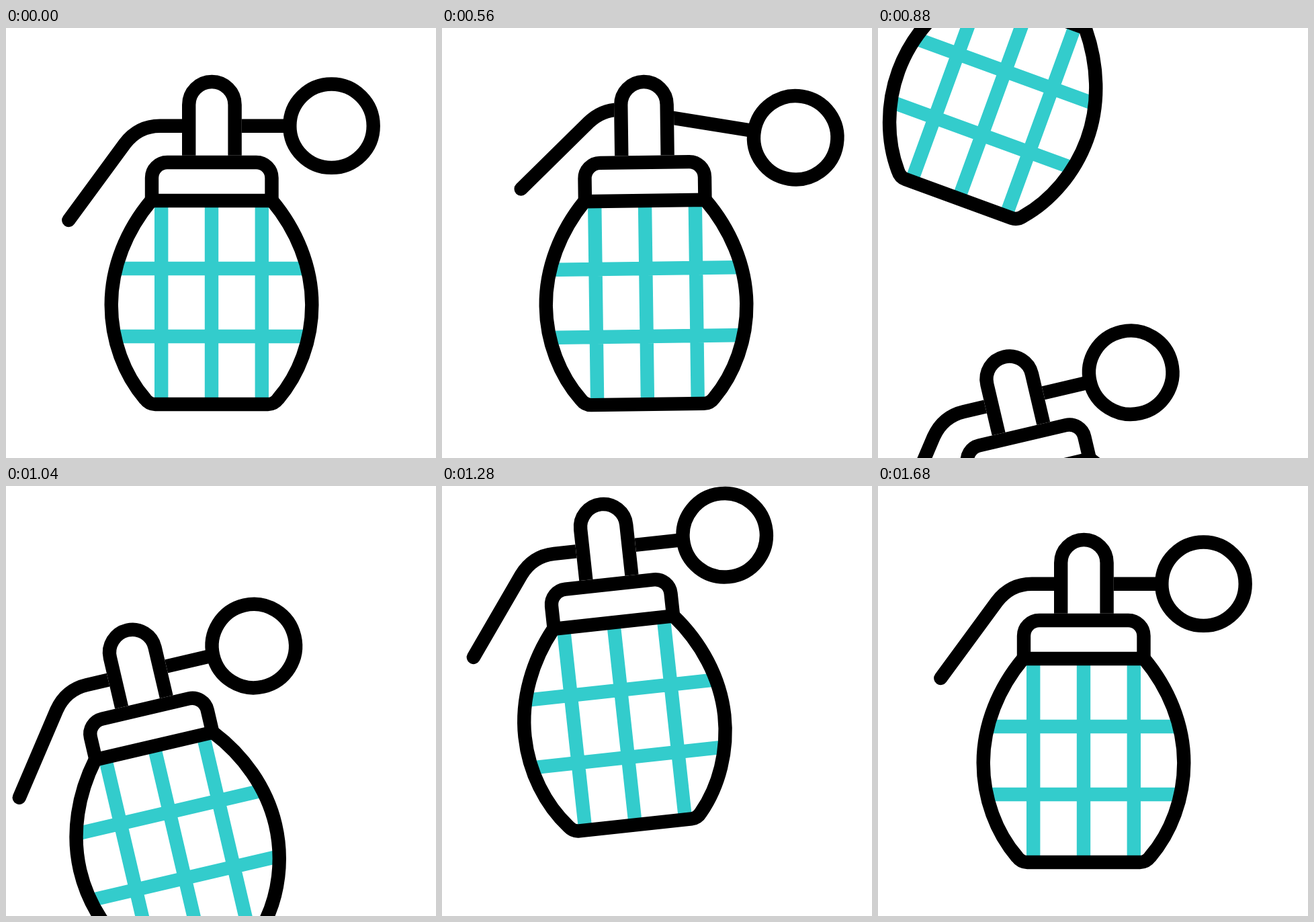
Recreate the animation shown at these times as an HTML page with a canvas. Size 640 by 640 pixels, loop 2 s.

```html
<!DOCTYPE html>
<html lang="en">
<head>
<meta charset="utf-8">
<title>Grenade</title>
<style>
  html, body { margin: 0; width: 100%; height: 100%; overflow: hidden; background: #fff; }
  canvas { display: block; width: 100vw; height: 100vh; }
</style>
</head>
<body>
<canvas id="stage" width="640" height="640"></canvas>
<script>
const ctx = document.getElementById('stage').getContext('2d');
const LOOP = 2000, STEP = 40;
const BASE = [306, 560];
const HINGE = [306, 145.7];
const LAUNCH = 460, LIFT = 690, PEAK = 1270, LAND = 1465;

const lever = new Path2D('M93.3 286 L177 172 C190 155 208 145.7 229 145.7 H422');
const ring = new Path2D();
ring.arc(484.5, 145.7, 62.2, 0, Math.PI * 2);
const neck = new Path2D('M272.2 205 V114.2 A34.2 34.2 0 0 1 340.6 114.2 V205');
const cap = new Path2D('M217 257 V223 A23 23 0 0 1 240 200 H372.5 A23 23 0 0 1 395.5 223 V257');
const bars = new Path2D('M231.2 250 V565 M306 250 V565 M380.8 250 V565 M140 358 H472 M140 459 H472');

// The sides swell outwards by the given bulge; top and base keep their width.
function bottlePath(bulge) {
  const path = new Path2D(), mid = BASE[0];
  const belly = 149.3 + bulge, shoulder = 126 + bulge / 2, hip = 130 + bulge / 2;
  path.moveTo(mid - 90, 257);
  path.bezierCurveTo(mid - shoulder, 300, mid - belly, 355, mid - belly, 412);
  path.bezierCurveTo(mid - belly, 465, mid - hip, 516, mid - 99, 552);
  path.quadraticCurveTo(mid - 93, 560, mid - 84, 560);
  path.lineTo(mid + 84, 560);
  path.quadraticCurveTo(mid + 93, 560, mid + 99, 552);
  path.bezierCurveTo(mid + hip, 516, mid + belly, 465, mid + belly, 412);
  path.bezierCurveTo(mid + belly, 355, mid + shoulder, 300, mid + 90, 257);
  path.closePath();
  return path;
}

const progress = (t, from, to) => Math.min(1, Math.max(0, (t - from) / (to - from)));
const ease = (t, from, to) => (1 - Math.cos(Math.PI * progress(t, from, to))) / 2;
const hump = (t, from, to) => Math.sin(Math.PI * progress(t, from, to));

// Both parts lean apart, then the lever shoots right while the body swings and lifts off.
function leaving(t) {
  const windUp = ease(t, 200, LAUNCH);
  const fling = Math.max(0, t - LAUNCH) / 220;
  const lift = (Math.max(0, t - LIFT) / 190) ** 2;
  return {
    lever: {
      x: -55.6 * windUp + 351.6 * fling ** 1.6,
      y: 8 * windUp - 78 * fling ** 1.8,
      turn: 4.53 * windUp + 10.17 * fling
    },
    body: { x: -186 * lift, y: -306 * lift, turn: -4.58 * windUp + 10.63 * fling ** 1.3 }
  };
}

// Rises past its place, then drops back and lands with a squash.
function arriving(t) {
  const rise = Math.sin(Math.PI / 2 * progress(t, 700, PEAK)) ** 1.275;
  return {
    x: -19 * (ease(t, 620, 1160) - ease(t, 1250, 1470)),
    y: 740 * (1 - rise) - 56 + 64 * ease(t, PEAK, LAND) - 8 * ease(t, LAND, 1680),
    turn: -13.2 * (1 - ease(t, 1020, 1520)),
    squash: 5.9 * hump(t, 1320, 1560)
  };
}

function place([px, py], { x, y, turn }, draw) {
  ctx.save();
  ctx.translate(px + x, py + y);
  ctx.rotate(turn * Math.PI / 180);
  ctx.translate(-px, -py);
  draw();
  ctx.restore();
}

function shifted(dy, draw) {
  ctx.save();
  ctx.translate(0, dy);
  draw();
  ctx.restore();
}

function outline(path, color = '#000') {
  ctx.strokeStyle = color;
  ctx.stroke(path);
}

function solid(path) {
  ctx.fillStyle = '#fff';
  ctx.fill(path);
  outline(path, '#fff');
  outline(path);
}

function drawLever() {
  ctx.lineCap = 'round';
  outline(lever);
  outline(ring);
}

function drawBody(squash) {
  const bottle = bottlePath(squash * 1.2);
  ctx.lineCap = 'butt';
  shifted(squash * 2, () => solid(neck));
  shifted(squash, () => solid(cap));
  ctx.fillStyle = '#fff';
  ctx.fill(bottle);
  ctx.save();
  ctx.clip(bottle);
  outline(bars, '#33cccc');
  ctx.restore();
  outline(bottle);
}

function render(t) {
  ctx.fillStyle = '#fff';
  ctx.fillRect(0, 0, 640, 640);
  ctx.lineWidth = 20.4;
  ctx.lineJoin = 'round';

  if (t < 1080) {
    const { lever, body } = leaving(t);
    place(HINGE, lever, drawLever);
    place(BASE, body, () => drawBody(0));
  }
  if (t > 700) {
    const pose = arriving(t);
    place(BASE, pose, () => {
      shifted(pose.squash * 3, drawLever);
      drawBody(pose.squash);
    });
  }
}

const start = performance.now();
function tick() {
  const t = (performance.now() - start) % LOOP;
  render(Math.floor(t / STEP) * STEP);
  requestAnimationFrame(tick);
}
tick();
</script>
</body>
</html>
```
